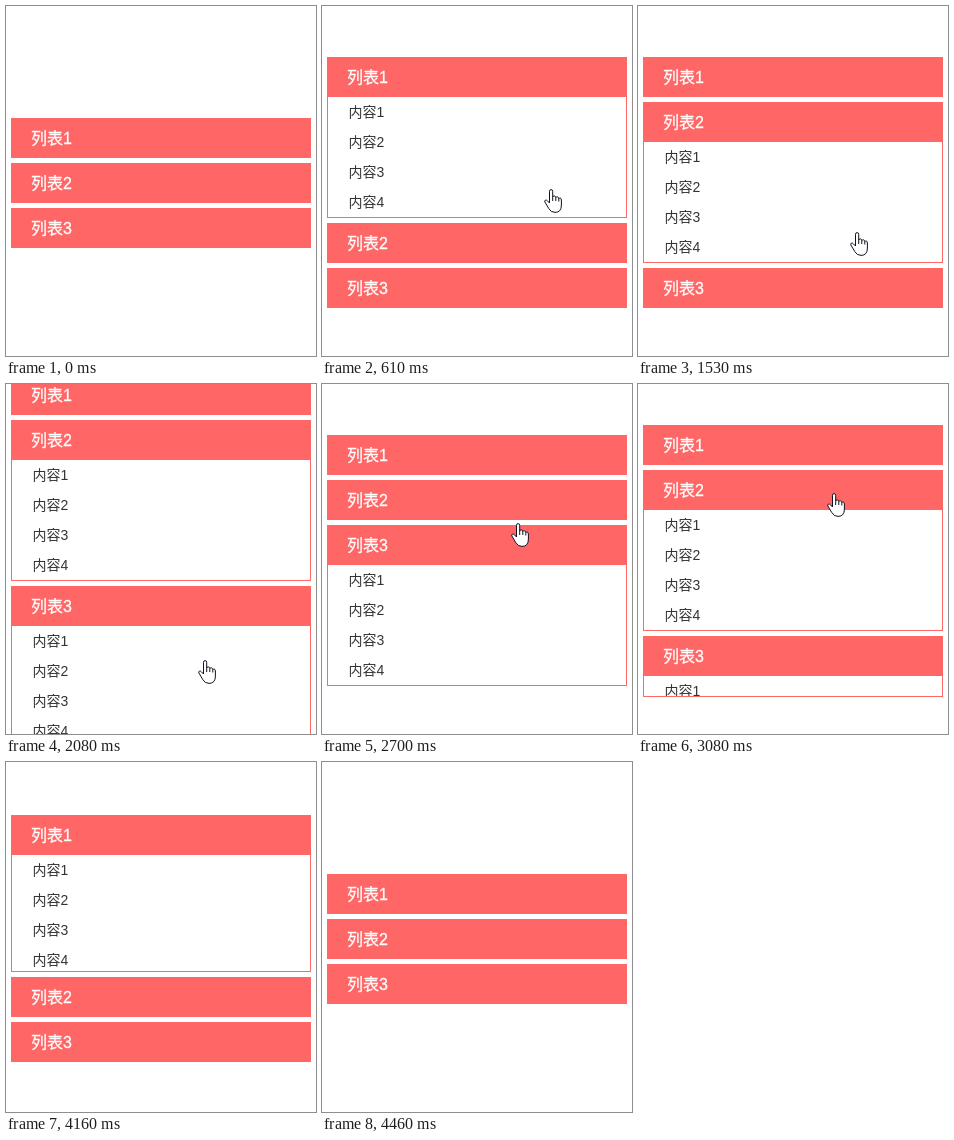
Write an HTML page that moves like this. It is 310 px wide and 350 px high and loops after 4.54 s.

```html
<!DOCTYPE html>
<html lang="zh-CN">
<head>
<meta charset="utf-8">
<title>列表</title>
<style>
html, body { margin: 0; width: 100%; height: 100%; overflow: hidden; background: #fff; }
body { position: relative; font-family: "Liberation Sans", "Noto Sans CJK SC", "Noto Sans CJK", sans-serif; }
.item {
  position: absolute; left: 5px; top: 0; width: 300px; height: 40px;
  box-sizing: border-box; overflow: hidden;
  border: 1px solid #f66; background: #fff;
}
.head {
  height: 39px; line-height: 40px; padding-left: 19px;
  font-size: 16px; color: #fff; background: #f66; -webkit-text-stroke: .3px #fff;
}
.row { height: 30px; line-height: 30px; padding-left: 20.5px; font-size: 14px; color: #333; }
#hand { position: absolute; left: 0; top: 0; width: 18px; height: 24px; }
</style>
</head>
<body>
<svg id="hand" viewBox="0 0 18 24" fill="#fff" stroke="#112" stroke-linejoin="round">
  <path d="M5.5 14V2.3Q5.5 .6 7.1 .6T8.7 2.3V8.2Q8.9 6.8 10.3 6.9T11.8 8.6Q12.1 7.6 13.4 7.8T14.8 9.6Q15.2 8.8 16.2 9T17.4 11V16Q17.4 23.4 11 23.4Q6.8 23.4 4.8 19.6L.9 13Q.3 11.8 1.3 11.2T3.4 11.8Z"/>
  <path fill="none" d="M8.7 8.2V12M11.8 8.6V12M14.8 9.6V12.5"/>
</svg>
<script>
const LOOP = 4540, START = 150, STEP = 76.96;
const HEAD = 40, GAP = 5, BODY = 121, MIDDLE = 177;
const MAX_HEIGHT = 500, DURATION = 500;

// The pointer visits lists 1, 2, 3, 2, 1; each visit ends as the next begins
const visits = [0, 1, 2, 1, 0];
const moves = [140, 920, 1977, 2703, 3226, 3919];

// Pointer stops
const stops = [
  { t: 150, x: 232, y: 122 },
  { t: 920, x: 216, y: 216 },
  { t: 1350, x: 216, y: 216 },
  { t: 2074, x: 192, y: 276 },
  { t: 2690, x: 189, y: 139 },
  { t: 3459, x: 189, y: 79 },
  { t: 3850, x: 230, y: 109 }
];

const hand = document.getElementById('hand');
const items = [1, 2, 3].map(i => {
  const el = document.createElement('div');
  el.className = 'item';
  const rows = [1, 2, 3, 4].map(n => `<div class="row">内容${n}</div>`).join('');
  el.innerHTML = `<div class="head">列表${i}</div>${rows}`;
  document.body.insertBefore(el, hand);
  return el;
});

// cubic-bezier(.25, .1, .25, 1)
function ease(x) {
  if (x <= 0) return 0;
  if (x >= 1) return 1;
  let lo = 0, hi = 1, s = 0.5;
  for (let i = 0; i < 24; i++) {
    s = (lo + hi) / 2;
    if (0.75 * s * (1 - s) + s ** 3 < x) lo = s; else hi = s;
  }
  return 0.3 * s * (1 - s) ** 2 + 3 * (1 - s) * s * s + s ** 3;
}

const since = (t, from) => ease((t - from) / DURATION);

// The height limit overshoots the content, so closing shows late and opening is quick
function bodyHeight(list, t) {
  let limit = 0;
  visits.forEach((v, i) => {
    if (v === list) limit += MAX_HEIGHT * (since(t, moves[i]) - since(t, moves[i + 1]));
  });
  return Math.round(Math.max(0, Math.min(BODY, limit)));
}

function movePointer(t) {
  const i = stops.findIndex(s => s.t > t);
  hand.style.visibility = i > 0 ? 'visible' : 'hidden';
  if (i <= 0) return;
  const a = stops[i - 1], b = stops[i];
  const p = (t - a.t) / (b.t - a.t), k = p * p * (3 - 2 * p);
  hand.style.left = Math.round(a.x + (b.x - a.x) * k) + 'px';
  hand.style.top = Math.round(a.y + (b.y - a.y) * k) + 'px';
}

function draw(t) {
  const heights = items.map((_, i) => HEAD + bodyHeight(i, t));
  const total = heights.reduce((a, b) => a + b, 2 * GAP);
  let y = Math.floor(MIDDLE - total / 2);
  items.forEach((el, i) => {
    el.style.top = y + 'px';
    el.style.height = heights[i] + 'px';
    y += heights[i] + GAP;
  });
  movePointer(t);
}

const origin = performance.now();
function tick() {
  const t = Math.max(0, performance.now() - origin) % LOOP;
  const step = Math.floor((t - START + 7) / STEP);
  draw(step < 0 ? 0 : START + step * STEP);
  requestAnimationFrame(tick);
}
tick();
</script>
</body>
</html>
```
